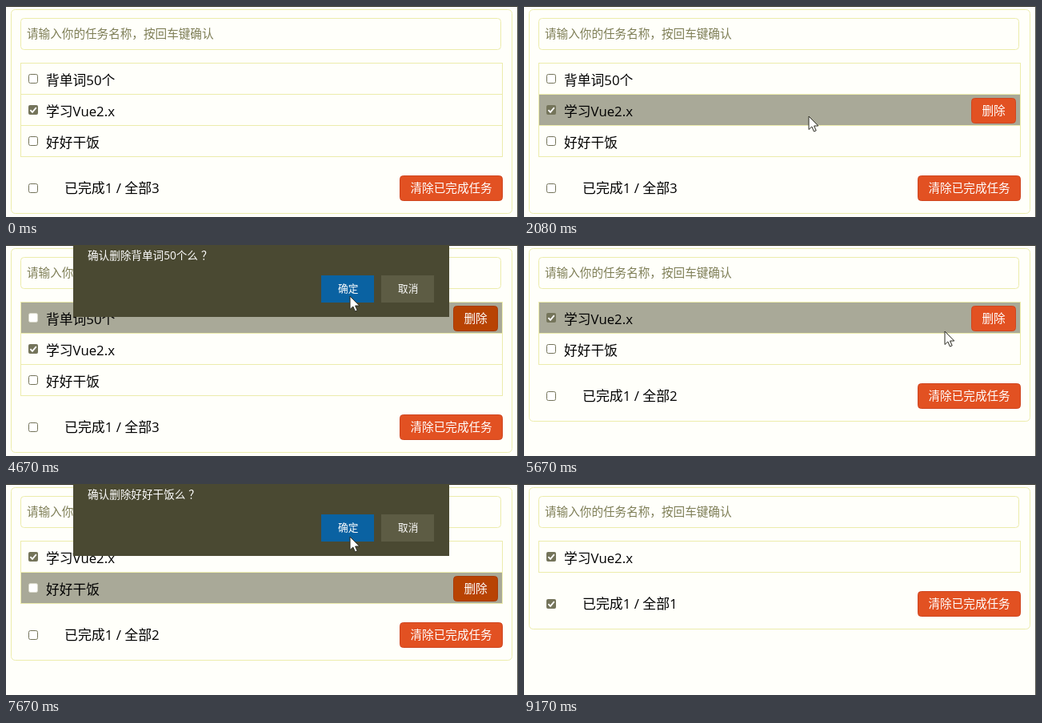
These frames come from a looping animation (640x264 px, 9.51 s). An HTML page:

```html
<!DOCTYPE html>
<html lang="zh-CN">
<head>
<meta charset="utf-8">
<title>任务列表</title>
<style>
  html, body { margin: 0; width: 100%; height: 100%; overflow: hidden; background: #fffffa; }
  svg { display: block; width: 640px; height: 264px; }
  text { font-family: "Open Sans", "Noto Sans CJK SC", "Noto Sans CJK", sans-serif; white-space: pre; }
</style>
</head>
<body>
<svg id="stage" viewBox="0 0 640 264"></svg>
<script>
const LOOP = 9510, STEP = 1000 / 12;
const PAGE = '#fffffa', LINE = '#ececac', INK = '#000', GREY = '#74745a';
const LEFT = 18, RIGHT = 621, TOP = 72, ROW = 39;
const stage = document.getElementById('stage');

const tasks = [
  { name: '背单词50个', done: false, removed: 4830 },
  { name: '学习Vue2.x', done: true, removed: Infinity },
  { name: '好好干饭', done: false, removed: 7996 }
];
const dialogs = [
  { name: tasks[0].name, open: 3580, close: 4830 },
  { name: tasks[2].name, open: 6163, close: 7996 }
];

// Pointer stops: time, x, y
const path = [
  [167, 388, 276], [667, 348, 168], [917, 348, 168], [1167, 345, 138],
  [1333, 344, 133], [1500, 344, 133], [1833, 350, 96], [2083, 356, 138],
  [2417, 356, 138], [3250, 610, 97], [3417, 604, 93], [3917, 604, 93],
  [4667, 430, 64], [5333, 430, 64], [5667, 526, 108], [6000, 582, 138],
  [6570, 582, 138], [7250, 430, 66], [8250, 430, 66], [9000, 452, 276]
];

function pointer(t) {
  const i = path.findIndex(p => p[0] > t);
  if (i < 1) return null;
  const [t0, x0, y0] = path[i - 1], [t1, x1, y1] = path[i];
  const k = (t - t0) / (t1 - t0), e = k * k * (3 - 2 * k);
  return { x: x0 + (x1 - x0) * e, y: y0 + (y1 - y0) * e };
}

const inside = (p, x, y, w, h) => !!p && p.x >= x && p.x < x + w && p.y >= y && p.y < y + h;

const rect = (x, y, w, h, fill, more = '') =>
  `<rect x="${x}" y="${y}" width="${w}" height="${h}" fill="${fill}" ${more}/>`;

const frame = (x, y, w, h, r) =>
  rect(x + .5, y + .5, w - 1, h - 1, 'none', `rx="${r}" stroke="${LINE}"`);

const label = (x, y, size, fill, s) =>
  `<text x="${x}" y="${y}" font-size="${size}" fill="${fill}">${s}</text>`;

function checkbox(cy, on, plain) {
  if (!on) return rect(28.5, cy - 6, 11, 11, '#fff', `rx="2" stroke="${plain ? '#d8d8c8' : GREY}"`);
  return rect(28, cy - 6.5, 12, 12, GREY, 'rx="2"') +
    `<path d="M30.4 ${cy - .3}l2.6 2.7 4.8-5.7" fill="none" stroke="#fff" stroke-width="1.8"/>`;
}

const button = (x, y, w, s, hot) =>
  rect(x + .5, y + .5, w - 1, 31, hot ? '#b84303' : '#e25122', `rx="4" stroke="${hot ? '#a83a08' : '#cf4620'}"`) +
  label(x + 13.5, y + 20.8, 14.6, '#fff', s);

function taskRow(task, i, spot) {
  const y = TOP + i * ROW;
  const hover = inside(spot, LEFT, y, RIGHT - LEFT, ROW);
  let out = hover ? rect(LEFT, y, RIGHT - LEFT, ROW, '#a9a998') : '';
  out += checkbox(y + 19.5, task.done, hover) + label(50, y + 27.2, 16.8, INK, task.name);
  if (hover) out += button(559, y + 4, 56, '删除', inside(spot, 559, y + 4, 56, 32));
  return out;
}

function footer(list) {
  const y = TOP + list.length * ROW;
  const done = list.filter(t => t.done).length;
  return checkbox(y + 39.5, done === list.length) +
    label(73, y + 45, 16.9, INK, `已完成${done} / 全部${list.length}`) +
    button(492, y + 23, 129, '清除已完成任务');
}

const choice = (x, fill, s) => rect(x, 38, 66, 34, fill) + label(x + 21, 58.7, 12.7, '#fff', s);

function dialogBox(d, t, p) {
  const over = x => inside(p, x, 38, 66, 34);
  return `<g opacity="${t - d.open < STEP - 5 ? .6 : 1}">` +
    rect(84, 0, 470, 90, '#4a4932') +
    label(102, 18, 13.6, '#fff', `确认删除${d.name}么<tspan dx="4">？</tspan>`) +
    choice(394, over(394) ? '#0a62a2' : '#0569ae', '确定') +
    choice(469, over(469) ? '#6c6b50' : '#5d5c44', '取消') + '</g>';
}

function cursor(p, hand) {
  const shape = hand
    ? 'M-1.7 1.5Q0-1.2 1.7 1.5V7.5Q3.4 6.4 4.6 8Q6.2 7 7.4 8.8Q10 8 10 11V15.5L8 19V21.5H-1V19L-6.5 12.5Q-7 9.6-4.3 10.6L-1.7 13Z'
    : 'M0 0V16.5L3.8 13L6.4 19L9.2 17.8L6.6 12H11.8Z';
  const knuckles = hand ? '<path d="M1.7 7.5v4M4.6 8v3.8M7.4 8.8v3.4" fill="none"/>' : '';
  return `<g transform="translate(${p.x.toFixed(2)} ${p.y.toFixed(2)})" stroke="#2a2a20" stroke-linejoin="round">` +
    `<path d="${shape}" fill="#fff"/>${knuckles}</g>`;
}

function draw(t) {
  const p = pointer(t);
  const dialog = dialogs.find(d => t >= d.open && t < d.close);
  // An open dialog freezes the hover state of the page.
  const spot = dialog ? pointer(dialog.open) : p;
  const list = tasks.filter(task => t < task.removed);
  const n = list.length, listH = n * ROW;

  let out = rect(0, 0, 640, 264, PAGE) + frame(6, 4, 627, listH + 139, 5);
  out += rect(0, 0, 640, 1, '#26261e') + rect(639, 0, 1, 264, '#55554a');
  out += frame(18, 15, 601, 40, 4) + label(26, 40.3, 14.6, '#7e7e56', '请输入你的任务名称，按回车键确认');
  out += list.map((task, i) => taskRow(task, i, spot)).join('');
  for (let i = 1; i < n; i++) out += rect(LEFT, TOP + i * ROW - 1, RIGHT - LEFT, 1, LINE);
  out += frame(LEFT, TOP - 1, RIGHT - LEFT, listH + 1, 0) + footer(list);
  if (dialog) out += dialogBox(dialog, t, p);
  if (p) {
    const row = Math.floor((p.y - TOP) / ROW);
    const onDialog = dialog && inside(p, 84, 0, 470, 90);
    const hand = !onDialog && row >= 0 && row < n && inside(p, 559, TOP + row * ROW + 4, 56, 32);
    out += cursor(p, hand);
  }
  stage.innerHTML = out;
}

let last = -1;
function tick() {
  const step = Math.floor((performance.now() % LOOP + 4) / STEP);
  if (step !== last) draw((last = step) * STEP);
  requestAnimationFrame(tick);
}
tick();
</script>
</body>
</html>
```
